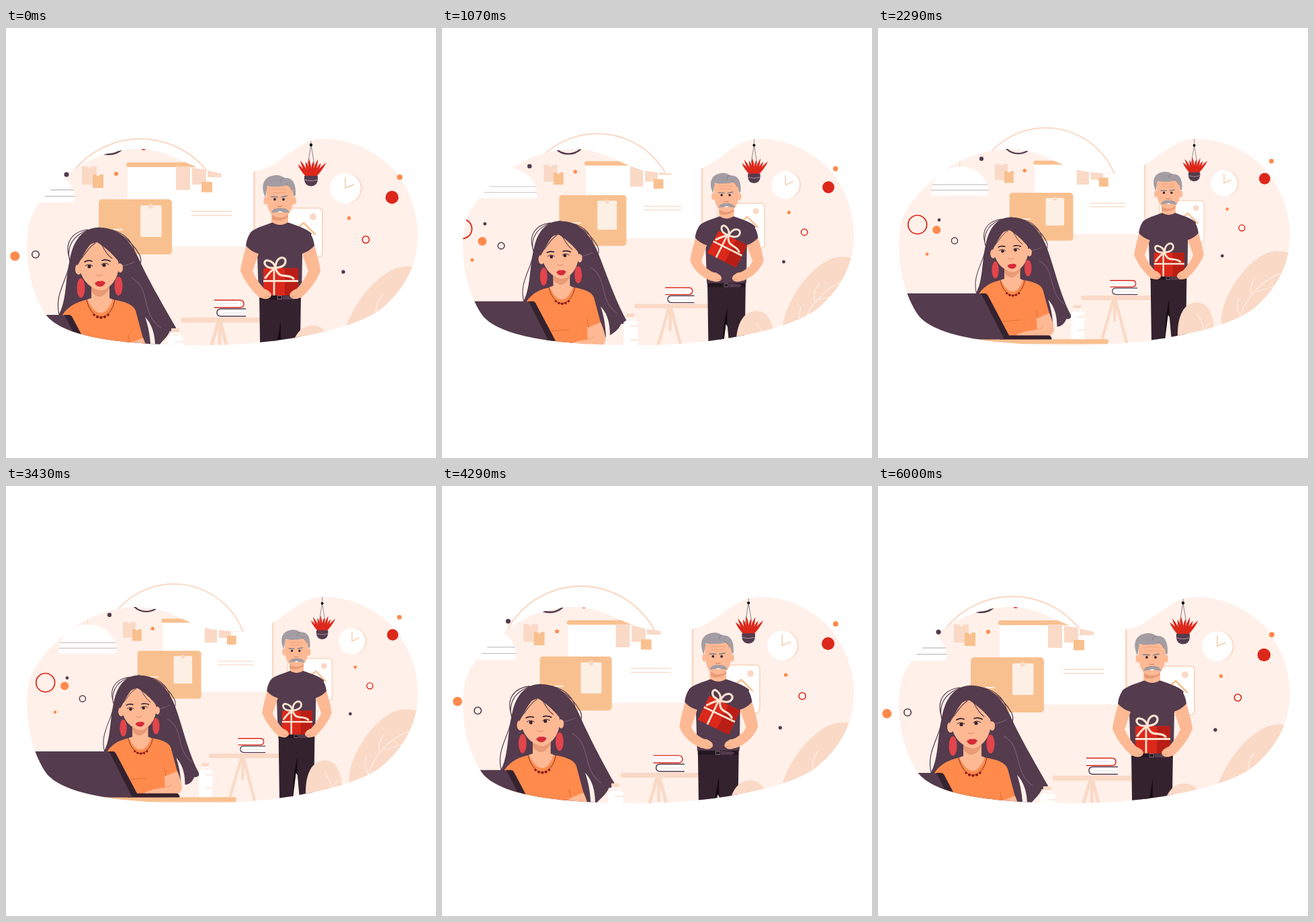
An HTML page for the animation above (6.07 s loop, 640x640 px).

```html
<!DOCTYPE html>
<html>
<head>
<meta charset="utf-8">
<style>
html, body { margin: 0; width: 100%; height: 100%; overflow: hidden; background: #fff }
svg { display: block; width: 100vw; height: 100vh }
.line { fill: none; stroke-linecap: round; stroke-linejoin: round }
.peach { fill: #fad9c6 } .amber { fill: #f9c08f } .orange { fill: #ff8a4c }
.plum { fill: #543b4d } .ink { fill: #35222f } .red { fill: #dc281b }
.skin { fill: #fdb994 } .white { fill: #fff } .grey { fill: #a39da3 }
.sPeach { stroke: #fad9c6 } .sPlum { stroke: #543b4d } .sRed { stroke: #dc281b } .sCream { stroke: #fde3d0 }
</style>
</head>
<body>
<svg viewBox="0 0 640 640">
<defs>
  <path id="blob" d="M31 322C32 290 38 275 52 258C75 228 120 184 190 180C240 178 265 205 305 213C345 219 375 217 400 202C425 186 445 165 472 165C512 165 551 183 577 211C600 238 613 275 613 308C613 350 595 385 565 412C530 448 400 475 275 472C180 471 92 462 62 430C45 408 31 368 31 322Z"/>
  <clipPath id="mask"><use href="#blob"/></clipPath>
  <g id="arm" class="skin">
    <path class="forearm"/>
    <g class="hand">
      <ellipse rx="11" ry="7" transform="rotate(14)"/>
      <path d="M-9-2Q-5-10 3-7L8-3L2 2Z"/>
      <path class="line" stroke="#e89c78" d="M2 3L9 4"/>
    </g>
  </g>
  <path id="sleeve" class="plum" d="M395 290C378 296 366 300 363 306Q358 314 357 324Q365 333 376 336L384 310Z"/>
</defs>

<g class="cam"><g class="bob">
  <circle class="line sPeach" cx="200" cy="292" r="127" stroke-width="2.2"/>
</g></g>
<use href="#blob" fill="#fff0e9"/>

<g clip-path="url(#mask)"><g class="cam">
  <!-- wall -->
  <rect class="white" x="181" y="205" width="188" height="120"/>
  <path class="line sPeach" stroke-width="3" d="M369.5 206V325"/>
  <rect class="amber" x="179" y="200" width="194" height="7" rx="3.5"/>
  <path class="peach" d="M253 206H274V241H253ZM277 208L298 211V233H277ZM300 212L321 217V222H300Z"/>
  <rect class="amber" x="291" y="229" width="16" height="15.500" rx="1"/>
  <path class="peach" d="M113 206H121Q124 212 127 206H135V233H113Z"/>
  <path class="amber" d="M129 218H134Q137 223 140 218H145V238H129Z"/>
  <path class="line sPeach" stroke-width="1.300" d="M276 273H336M276 279H336"/>
  <rect class="amber" x="138" y="255" width="109" height="82" rx="5"/>
  <rect fill="#fcefe4" x="200" y="264" width="31.500" height="47" rx="2"/>
  <circle class="peach" cx="215.500" cy="265" r="3.500"/>
  <path class="line" stroke="#fff" stroke-width="1.500" d="M160 300H173"/>
  <circle class="line sPlum" cx="153" cy="159" r="29" stroke-width="2.600"/>
  <circle class="red" cx="205" cy="178" r="4"/>
  <path class="line sPeach" stroke-width="1.500" d="M53 198V212"/>
  <path class="white" d="M4 260V250C12 197 94 197 102 250V260Z"/>
  <path class="line" stroke="#c8c2c5" stroke-width="1.300" d="M6 241H100M4 250.500H102"/>
  <circle class="line sRed" cx="-19.500" cy="309.500" r="16" stroke-width="2"/>
  <circle class="line sPlum" cx="44" cy="337" r="5.300" stroke-width="1.600"/>
  <circle class="line sRed" cx="535.500" cy="315" r="5.200" stroke-width="1.600"/>
  <circle class="plum" cx="17.600" cy="301.500" r="2.700"/>
  <circle class="plum" cx="502" cy="363" r="2.700"/>
  <circle class="orange" cx="-3" cy="360" r="2.800"/>
  <circle class="orange" cx="164" cy="217" r="3"/>
  <circle class="orange" cx="510.500" cy="283" r="2.800"/>

  <rect class="white sPeach" stroke-width="2" x="395" y="268" width="76" height="73" rx="6"/>
  <circle class="peach" cx="457" cy="281" r="5"/>
  <path class="line" stroke="#f9c08f" stroke-width="2.500" stroke-linecap="butt" d="M424 306L443 290L460 307"/>
  <path class="line sPeach" stroke-width="1.500" d="M432 308L441 300L450 308"/>

  <circle class="peach" cx="507.500" cy="238.500" r="22.500"/>
  <circle class="white" cx="505" cy="238.500" r="22.700"/>
  <path class="line" stroke="#f4cba9" stroke-width="1.500" d="M505 223V238.500L517 233"/>

  <path class="line" stroke="#8d7d85" d="M454 150V174L446 222M454 174L462 222"/>
  <circle cx="454" cy="174" r="2.200"/>
  <g id="leaves" class="red"></g>
  <path class="plum" d="M444 220H464V226Q463 235 454 235.500Q445 235 444 226Z"/>
  <path class="line" stroke="#c9b4bb" stroke-width=".8" d="M444.500 226Q454 229 463.500 226"/>

  <path class="peach" d="M500 470C505 420 555 358 592 355Q625 354 650 370V530H500Z"/>
  <path class="line" stroke="#fff0e9" stroke-width="1.300" d="M530 476C540 432 575 395 625 387M533 465Q524 452 530 436M552 428Q548 412 560 398M558 424Q580 421 600 410"/>

  <!-- table, books -->
  <path class="line sPeach" stroke-width="5" d="M316 437L295 510M319 437L338 510M318 437V473"/>
  <rect class="peach" x="260" y="431" width="130" height="7.500" rx="3.500"/>
  <g class="white" stroke-width="1.500">
    <path class="sRed" d="M310 405H348Q354 405 354 410.500T348 416H310"/>
    <path class="sPlum" d="M357 418H320Q314 418 314 423.500T320 429H357"/>
  </g>
  <path class="line" stroke="#e3dde2" d="M311 410H345M322 424H357"/>

  <g class="near">
  <!-- man -->
  <path fill="#140b12" d="M400 436L408 428L413 440L411 470L407 464L402 505H396Z"/>
  <path class="ink" d="M377 396H439L437 530H415L409 462V436L403 470L401 530H379Z"/>
  <path class="plum" d="M395 290C402 286 414 286 421 290C432 294 450 300 455 306L441 336L440 398H376L374 336L363 306Z"/>
  <rect fill="#241620" x="377" y="397.500" width="61" height="6.500"/>
  <rect class="line" x="404.500" y="398.500" width="6" height="5" stroke="#81717a"/>
  <path class="plum" d="M412 398L429 399L433 401.500L428 404H412Z"/>
  <path class="skin" d="M396 270H420V289Q408 297 396 289Z"/>
  <path fill="#e99b76" d="M396 277Q408 287 420 277V281Q408 290 396 285Z"/>
  <ellipse class="skin" cx="386.500" cy="257" rx="3" ry="6"/>
  <ellipse class="skin" cx="429" cy="257" rx="3" ry="6"/>
  <path class="skin" d="M387 238C395 230 421 230 428 240L427 262Q423 282 408 282T389 264Z"/>
  <path class="grey" d="M386 252C379 237 382 223 396 220Q406 217 414 223C427 222 432 232 431 249L428 251Q428 239 420 234Q402 238 389 235Z"/>
  <path class="line" stroke="#786e77" stroke-width=".8" d="M414 223Q407 225 409 229M417 232Q424 236 425 241"/>
  <path class="line" stroke="#e89c78" stroke-width=".8" d="M397 241Q407 238 418 241M398 245H416"/>
  <path class="line" stroke="#918891" stroke-width="2" d="M395 251L404 251.500M410 251.500L418 250"/>
  <g class="ink"><circle cx="400" cy="255" r="1.900"/><circle cx="413" cy="255" r="1.900"/></g>
  <path class="line" stroke="#c97552" d="M404 265Q407 267 411 265"/>
  <path class="white" d="M403 272H413Q408 277 403 272Z"/>
  <path class="grey" d="M395 275Q397 267 408 268Q419 267 422 275Q415 275 408 272.500Q401 275 395 275Z"/>

  <g id="gift">
    <rect class="red" x="383" y="357.500" width="52" height="40.500"/>
    <path fill="#b91e16" d="M415 357.500H435V398H415ZM383 374H435V378H383Z"/>
    <g class="line sCream" stroke-width="3.200">
      <path d="M399 357V398M383 376.500H435" stroke-linecap="butt" stroke-width="2.800"/>
      <path d="M401 357C382 359 382 344 390 346Q399 348 401 357C402 338 417 339 416 348Q415 356 401 357M401 357Q393 362 386 372M401 357C407 376 418 364 428 373"/>
    </g>
  </g>
  <use href="#arm"/><use href="#arm" transform="translate(817) scale(-1 1)"/>
  <use href="#sleeve"/><use href="#sleeve" transform="translate(816) scale(-1 1)"/>

  <path class="peach" d="M426 530C416 464 436 440 460 443C482 446 488 475 488 530Z"/>
  <path class="line" stroke="#fff0e9" stroke-width="1.200" d="M470 505Q470 480 456 462M470 488L479 476"/>

  <!-- woman -->
  <path id="hair" class="plum"/>
  <path id="gap" fill="#fff0e9" d="M207 430C220 444 223 462 222 486H216C215 462 213 448 207 430Z"/>
  <g class="line sPlum" stroke-width="1.200">
    <path d="M80 430C70 396 92 376 96 345M108 370C82 340 90 303 139 297M128 299C155 293 184 311 199 338Q204 350 195 358M96 347C85 320 98 303 122 300M150 299Q183 304 191 331"/>
    <path stroke="#7a5b70" d="M174 354Q184 352 191 348M187 372C216 387 200 425 230 446"/>
  </g>
  <path class="orange" d="M84 427C94 412 108 407 122 404H158C178 407 190 412 193 421L204 462L185 470V510H92V440Z"/>
  <path class="skin" d="M121 404L127 402V382H154V402L159 404Q151 424 141 424T121 404Z"/>
  <path fill="#e99b76" d="M127 384Q141 397 154 384V388Q146 401 138 400Q130 398 127 391Z"/>
  <path class="line" stroke="#7d2f22" d="M120 405Q125 427 141 431Q158 427 162 405"/>
  <g fill="#8e1b18"><circle cx="131" cy="427" r="1.800"/><circle cx="136" cy="430" r="2"/><circle cx="141.500" cy="431" r="2.100"/><circle cx="147" cy="430" r="2"/><circle cx="152" cy="427" r="1.800"/></g>
  <path class="line" stroke="#d86e36" d="M182 456L185 472M125 475L152 473"/>
  <ellipse class="skin" cx="108" cy="359" rx="5" ry="8"/>
  <ellipse class="skin" cx="170" cy="357" rx="4" ry="7"/>
  <g fill="#e2454b"><ellipse cx="111.500" cy="387" rx="6" ry="14.500"/><ellipse cx="167.500" cy="384" rx="6" ry="14"/></g>
  <path class="skin" d="M108 350C112 330 123 320 136 319C153 321 165 335 168 352C168 373 155 389 141 390C123 388 110 372 108 350Z"/>
  <path class="plum" d="M106 354C106 325 118 312 137 314C121 321 117 337 106 354ZM131 316C152 311 173 330 172 352C164 344 155 330 131 316Z"/>
  <path class="line sPlum" stroke-width="1.100" d="M133 320C120 328 118 339 109 346M141 320Q150 338 158 343"/>
  <path class="line" stroke="#35222f" stroke-width="1.800" d="M117 348Q122 345 128 347M143 346Q149 344 155 347"/>
  <g class="ink"><circle cx="124" cy="355" r="2.600"/><circle cx="146" cy="353" r="2.600"/></g>
  <path class="line" stroke="#35222f" d="M118 354Q123 350 129 354M142 352Q147 348 153 352"/>
  <path class="line" stroke="#d88463" d="M134 367Q138 371 143 367"/>
  <path fill="#d52b39" d="M132 380Q137 375 140 377Q144 375 148 379Q145 385 140 385Q135 385 132 380Z"/>
  <path class="skin" d="M182 470L204 461Q212 480 212 490Q209 502 195 503H142Q150 493 183 489Z"/>
  <path class="line" stroke="#e89c78" d="M182 489Q190 488 194 484"/>

  <!-- desk -->
  <path class="white" d="M247 457V452H259V457L264 461V506H241V461Z"/>
  <path class="peach" d="M246 447H258V453H246Z"/>
  <path class="line sPeach" stroke-width="1.200" d="M252 467H264M252 490H264M249 457H257"/>
  <rect class="amber" x="-40" y="505.500" width="345" height="8" rx="4"/>
  <path class="ink" d="M86 427H94Q97 427 99 431L135 499H203Q208 500 208 506H120Z"/>
  <path class="plum" d="M-50 427H83Q87 427 89 431L127 506H-50Z"/>
  </g>
</g></g>

<g class="cam"><g class="bob">
  <circle class="orange" cx="13.300" cy="339.500" r="7"/>
  <circle class="plum" cx="90" cy="218" r="3.600"/>
  <circle class="orange" cx="586" cy="222" r="4"/>
  <circle class="red" cx="574.500" cy="252" r="9.700"/>
</g></g>
</svg>

<script>
const LOOP = 6070, OUT = 530, BACK = 3440, PAN = 1480, TOSS = 1360;
const all = s => document.querySelectorAll(s);
const clamp = v => Math.min(1, Math.max(0, v));
const put = (list, value, name = 'transform') => list.forEach(e => e.setAttribute(name, value));

// plant: a fan of pointed leaves
document.getElementById('leaves').innerHTML = [-38, -27, -15, -5, 6, 17, 28, 39].map((a, i) =>
  `<path d="M-1.5 0Q-3.4-15 0-${i % 2 ? 28 : 24}Q3.4-15 1.5 0Z" transform="translate(${454 + a / 8} 222) rotate(${a})"/>`).join('');

// cubic-bezier(.25, .1, .25, 1)
function ease(x) {
  let lo = 0, hi = 1, s;
  for (let i = 0; i < 20; i++) {
    s = (lo + hi) / 2;
    if (.75 * s * (1 - s) + s ** 3 < x) lo = s; else hi = s;
  }
  return .3 * s * (1 - s) ** 2 + 3 * s * s * (1 - s) + s ** 3;
}
const toss = x => Math.pow(Math.max(0, Math.sin(Math.PI * clamp(x))), 1.6);

const cams = all('.cam'), near = all('.near'), bobs = all('.bob'), gift = all('#gift'), hand = all('.hand');
const forearm = all('.forearm'), hair = all('#hair'), gap = all('#gap');

function draw(now) {
  const t = now % LOOP;
  const pan = ease(clamp((t - OUT) / PAN)) - ease(clamp((t - BACK) / PAN));
  put(cams, `translate(582 180) scale(${1 - .13 * pan}) translate(-582 -180)`);
  put(near, `translate(${2.2 * pan} 0)`);
  put(bobs, `translate(0 ${-28 * (1 - Math.abs(1 - 2 * t / LOOP))})`);

  // the loose end of the hair swings down as the view widens
  const tx = 253 - 11 * pan, ty = 446 + 20 * pan;
  put(hair, `M78 428C91 405 88 372 95 345C100 315 115 297 139 297C166 297 185 316 197 342C210 372 ${tx - 20} ${ty - 35} ${tx} ${ty}Q${tx - 2} ${ty + 6} ${tx - 9} ${ty + 5}C${tx - 13} ${ty + 14} ${tx - 18} ${ty + 18} 216 ${484}L130 500L80 470Z`, 'd');
  put(gap, `translate(${-5 * pan} ${8 * pan})`);

  const g = toss((t - OUT) / TOSS) + toss((t - BACK) / TOSS);
  put(gift, `translate(0 ${-38.5 * g}) rotate(${29 * g} 409 378)`);

  const q = clamp(g * 2.6), x = 384 + 5 * q, y = 396 - 8 * q;
  put(hand, `translate(${x} ${y})`);
  put(forearm, `M359 320Q350 350 349 362Q358 384 ${x - 6} ${y + 6}L${x + 2} ${y - 6}Q372 375 367 362L376 336Z`, 'd');
}
function tick() {
  draw(performance.now());
  requestAnimationFrame(tick);
}
tick();
</script>
</body>
</html>
```
